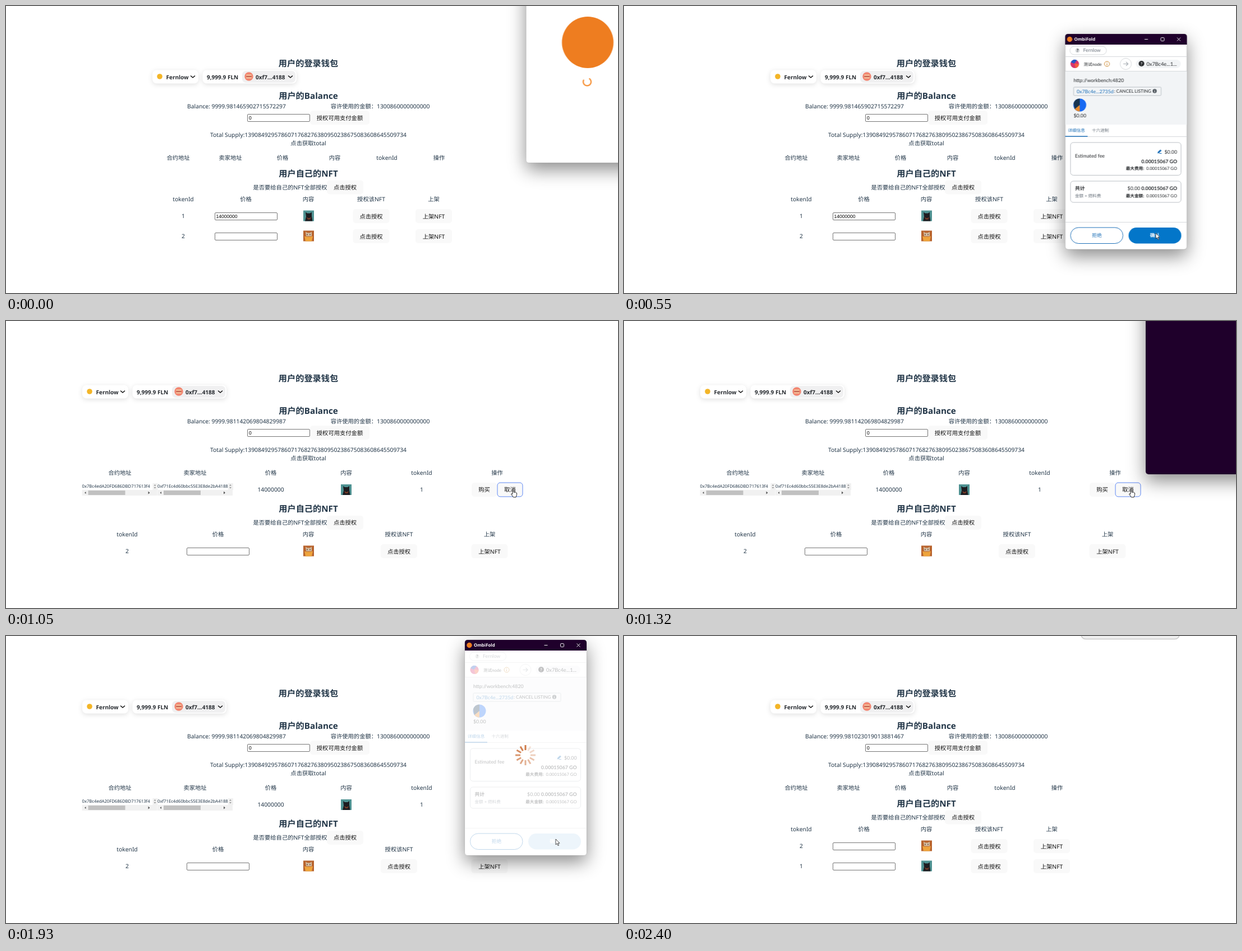
An HTML page for the animation above (2.67 s loop, 1091x513 px).

```html
<!DOCTYPE html>
<html lang="zh-CN">
<head>
<meta charset="utf-8">
<title>NFT wallet demo</title>
<style>
html, body { margin: 0; width: 100%; height: 100%; overflow: hidden; background: #fff; }
svg { display: block; }
text { font: 10.3px "Noto Sans", "Noto Sans CJK SC", "Noto Sans CJK", sans-serif; fill: #213547; text-rendering: geometricPrecision; }
.mid text, text.mid { text-anchor: middle; }
text.head { font-size: 15.2px; font-weight: 700; }
.button { fill: #f9f9f9; }
.button text { fill: #111; text-anchor: middle; }
.field { fill: #fff; stroke: #767676; }
text.value { font: 8.55px "Liberation Sans", sans-serif; fill: #000; }
text.hex { font-size: 7.7px; }
.wallet text { font-size: 10px; font-weight: 700; fill: #25292e; }
.card { fill: #fff; filter: drop-shadow(0 2px 4px rgba(0,0,0,.12)); }
.chevron { fill: none; stroke: #111; stroke-width: 1.6; stroke-linecap: round; stroke-linejoin: round; }
.ring { fill: none; stroke: #101010; stroke-width: 1.4; }

.frame { fill: #fff; stroke: #aaa; stroke-width: .6; filter: drop-shadow(0 12px 16px rgba(0,0,0,.45)); }
.form text { font-family: Lato, "Noto Sans CJK SC", "Noto Sans CJK", sans-serif; font-size: 8.8px; fill: #24272a; }
.form text.small { font-size: 7.6px; }
.form text.gray { fill: #6a737d; }
.form text.blue { fill: #1e70b8; }
.form text.white { fill: #fff; }
.form .end { text-anchor: end; }
.form .line { fill: none; stroke: #d6d9dc; }
.form .box { fill: #fff; stroke: #bbc0c5; }
.b { font-weight: 700; }

[class*="at-"], #window, #arrow, #halo, .ticks { animation: 2670ms step-end infinite; }
.at-before { animation-name: before !important; }
.at-wide { animation-name: wide !important; }
.at-after { animation-name: after !important; }
.at-narrow { animation-name: narrow !important; }
.at-listed { animation-name: listed !important; }
.at-hover { animation-name: hover !important; }
.at-cancelled { animation-name: cancelled !important; }
.at-toast { animation-name: toast !important; }
.at-loading { animation-name: loading !important; }
.at-blank { animation-name: blank !important; }
.at-ready { animation-name: ready !important; }
.at-busy { animation-name: busy !important; }
#window { animation-name: window; }
#arrow { animation-name: arrow; }
#halo { animation-name: halo; }
.ticks { animation-name: tick; }
.arc { animation: spin 2670ms linear infinite; }

@keyframes before { 0% { opacity: 1 } 36.7%, 100% { opacity: 0 } }
@keyframes wide { 0% { opacity: 0 } 36.7% { opacity: 1 } 85.01%, 100% { opacity: 0 } }
@keyframes after { 0% { opacity: 0 } 85.01%, 100% { opacity: 1 } }
@keyframes narrow { 0% { opacity: 1 } 36.7% { opacity: 0 } 85.01%, 100% { opacity: 1 } }
@keyframes listed { 0% { opacity: 0 } 28.46% { opacity: 1 } 36.7%, 100% { opacity: 0 } }
@keyframes hover { 0% { opacity: 0 } 39.32% { opacity: 1 } 54.3%, 100% { opacity: 0 } }
@keyframes cancelled { 0% { opacity: 0 } 79.77% { opacity: 1 } 85.01%, 100% { opacity: 0 } }
@keyframes toast { 0% { opacity: 0 } 89.88%, 100% { opacity: 1 } }
@keyframes loading { 0% { opacity: 1 } 15.35% { opacity: 0 } 52.05% { opacity: 1 } 54.3%, 100% { opacity: 0 } }
@keyframes blank { 0% { opacity: 0 } 49.43% { opacity: 1 } 52.05%, 100% { opacity: 0 } }
@keyframes ready { 0% { opacity: 0 } 17.97% { opacity: 1 } 23.22% { opacity: 0 } 59.55% { opacity: 1 } 72.28%, 100% { opacity: 0 } }
@keyframes busy { 0% { opacity: 0 } 23.22% { opacity: 1 } 28.46% { opacity: 0 } 72.28% { opacity: 1 } 79.77%, 100% { opacity: 0 } }
@keyframes window {
  0% { transform: translate(927.5px, -105px); opacity: 1 }
  5.24% { transform: translate(913px, -90px); opacity: 1 }
  7.49% { transform: translate(850px, -20px); opacity: 1 }
  10.11% { transform: translate(786.5px, 50px); opacity: 1 }
  28.46% { transform: translate(930px, -111px); opacity: 0 }
  49.43% { transform: translate(930px, -111px); opacity: 1 }
  52.05% { transform: translate(927.5px, -105px); opacity: 1 }
  54.3% { transform: translate(905px, -70px); opacity: 1 }
  56.92% { transform: translate(866.5px, -17px); opacity: 1 }
  59.55% { transform: translate(818px, 7px); opacity: 1 }
  79.77%, 100% { transform: translate(818px, 7px); opacity: 0 }
}
@keyframes arrow {
  0% { transform: translate(925px, -6px); opacity: 0 }
  7.49% { transform: translate(925px, -6px); opacity: 1 }
  10.11% { transform: translate(862px, 63px); opacity: 1 }
  15.35% { transform: translate(905px, 240px); opacity: 1 }
  17.97% { transform: translate(948px, 406px); opacity: 1 }
  28.46% { transform: translate(948px, 406px); opacity: 0 }
  56.92% { transform: translate(931px, 5px); opacity: 1 }
  59.55% { transform: translate(884px, 27px); opacity: 1 }
  62.17% { transform: translate(980px, 363px); opacity: 1 }
  85.01%, 100% { transform: translate(980px, 363px); opacity: 0 }
}
@keyframes halo { 0% { opacity: 1 } 15.35% { opacity: 0 } 56.92% { opacity: 1 } 62.17%, 100% { opacity: 0 } }
@keyframes tick {
  0% { transform: rotate(0deg) } 25.84% { transform: rotate(60deg) }
  72.28% { transform: rotate(0deg) } 74.9% { transform: rotate(30deg) } 77.15%, 100% { transform: rotate(60deg) }
}
@keyframes spin { from { transform: rotate(-60deg) } to { transform: rotate(830deg) } }
</style>
</head>
<body>
<svg width="1091" height="513" viewBox="0 0 1091 513">
<defs>
  <rect id="field" class="field" x="-55.5" y="-6.5" width="111" height="13" rx="1.5"/>
  <rect id="outline" x="-32.5" y="-12.5" width="65" height="25" rx="5"/>
  <g id="approve" class="button"><use href="#outline"/><text y="4">点击授权</text></g>
  <g id="sell" class="button"><use href="#outline"/><text y="4">上架NFT</text></g>
  <g id="darkCat">
    <path fill="#4f9292" d="M0 0h19v19H0z"/>
    <path fill="#1d1c20" d="M4 3l3 2h5l3-2v7l1.5 9H3l2-8z"/>
    <path fill="#7b3b27" d="M6 12l4 2 4-2-2 4H8z"/>
  </g>
  <g id="paleCat">
    <path fill="#b8642f" d="M0 0h19v19H0z"/>
    <path fill="#d3bda2" d="M4 2l3 2h5l3-2v8H5z"/>
    <path fill="#eea43c" d="M2 10l4 1h7l4-1-2 9H4z"/>
    <path fill="#80614b" d="M6 6h2v2H6zM11 6h2v2h-2z"/>
  </g>
  <g id="wallet" class="wallet">
    <rect class="card" x="261" y="114.5" width="82" height="24" rx="7.5"/>
    <circle cx="274" cy="126" r="4.8" fill="#f3b527"/>
    <text x="285.5" y="130.5">Fernlow</text>
    <path class="chevron" d="M329.5 125l3.5 3 3.5-3"/>
    <rect class="card" x="350.5" y="114.5" width="167.5" height="24" rx="7.5"/>
    <text x="358" y="130.5">9,999.9 FLN</text>
    <rect x="421" y="116" width="95" height="21" rx="6.5" fill="#f0f0f1"/>
    <circle cx="433" cy="126" r="7.7" fill="#f28570"/>
    <path d="M429 123.5h8M429 128.5h8" stroke="#f4c9a0" stroke-width="2" stroke-linecap="round"/>
    <path d="M428.5 126h9" stroke="#8e4a3a"/>
    <text x="445" y="130.5">0xf7...4188</text>
    <path class="chevron" d="M503.5 125l3.5 3 3.5-3"/>
  </g>
  <g id="owned" class="mid">
    <text class="head" x="539" y="305">用户自己的NFT</text>
    <text x="506.5" y="328">是否要给自己的NFT全部授权</text>
    <use href="#approve" x="604.5" y="324"/>
  </g>
  <g id="scroller">
    <path fill="#f1f1f1" d="M0 302h134v10H0zM126 290h9v12h-9z"/>
    <path fill="#c1c1c1" d="M11 303h66v8H11z"/>
    <path fill="#555" d="M7 305v4l-2.5-2zM118 304.5v5l3-2.5z"/>
    <path fill="#999" d="M128 294.5h4l-2-2.5zM128 297h4l-2 2.5z"/>
  </g>
</defs>

<g class="mid">
  <text class="head" x="539" y="107.5">用户的登录钱包</text>
  <text class="head" x="539" y="165.5">用户的Balance</text>
  <text x="411" y="183" class="at-before">Balance: 9999.981465902715572297</text>
  <text x="411" y="183" class="at-wide">Balance: 9999.981142069804829987</text>
  <text x="411" y="183" class="at-after">Balance: 9999.981023019013881467</text>
  <text x="667" y="183">容许使用的金额：1300860000000000</text>
  <text x="539" y="234">Total Supply:1390849295786071768276380950238675083608645509734</text>
  <text x="539" y="249">点击获取total</text>
</g>
<use href="#field" x="486" y="200"/>
<text class="value" x="433" y="202.5">0</text>
<g class="button"><rect x="542" y="187" width="106" height="25" rx="5"/><text x="595" y="203.5">授权可用支付金额</text></g>

<g class="at-narrow">
  <use href="#wallet"/>
  <g class="mid">
    <text y="274.5"><tspan x="307">合约地址</tspan><tspan x="400">卖家地址</tspan><tspan x="493">价格</tspan><tspan x="586">内容</tspan><tspan x="679">tokenId</tspan><tspan x="772">操作</tspan></text>
    <text y="348.5"><tspan x="316">tokenId</tspan><tspan x="427.5">价格</tspan><tspan x="539">内容</tspan><tspan x="651">授权该NFT</tspan><tspan x="762.5">上架</tspan></text>
  </g>
  <use href="#owned"/>
  <use href="#field" x="428" y="376"/><use href="#field" x="428" y="412"/>
  <use href="#approve" x="651" y="375.5"/><use href="#approve" x="651" y="411.5"/>
  <use href="#sell" x="762.5" y="375.5"/><use href="#sell" x="762.5" y="411.5"/>
</g>
<g class="at-before">
  <text class="mid" y="379"><tspan x="316">1</tspan><tspan x="316" y="415">2</tspan></text>
  <text class="value" x="374.5" y="379">14000000</text>
  <use href="#darkCat" x="530" y="365.5"/><use href="#paleCat" x="530" y="401.5"/>
</g>
<g class="at-after">
  <text class="mid" y="379"><tspan x="316">2</tspan><tspan x="316" y="415">1</tspan></text>
  <use href="#paleCat" x="530" y="365.5"/><use href="#darkCat" x="530" y="401.5"/>
</g>
<g class="at-listed"><use href="#outline" class="ring" x="762.5" y="375.5"/></g>

<g class="at-wide">
  <use href="#wallet" x="-125"/>
  <g class="mid">
    <text y="274.5"><tspan x="203">合约地址</tspan><tspan x="337">卖家地址</tspan><tspan x="472">价格</tspan><tspan x="606.5">内容</tspan><tspan x="741">tokenId</tspan><tspan x="875.5">操作</tspan></text>
    <text y="305"><tspan x="472">14000000</tspan><tspan x="741">1</tspan></text>
    <text y="384.5"><tspan x="216">tokenId</tspan><tspan x="378">价格</tspan><tspan x="539">内容</tspan><tspan x="700.5">授权该NFT</tspan><tspan x="862">上架</tspan></text>
    <text x="216" y="415">2</text>
  </g>
  <use href="#scroller" x="135.5"/><use href="#scroller" x="270"/>
  <text class="hex" x="135.5" y="298">0x7Bc4edA20FD686DBD717613f4</text>
  <text class="hex" x="270" y="298">0xf71Ec4d60bbc55E3E8de2bA4188</text>
  <use href="#darkCat" x="597" y="292"/><use href="#paleCat" x="530" y="401.5"/>
  <g class="button">
    <rect x="830" y="289" width="45" height="25" rx="5"/><text x="852.5" y="305">购买</text>
    <rect x="876" y="289" width="45" height="25" rx="5"/><text x="898.5" y="305">取消</text>
  </g>
  <use href="#owned" y="36.3"/>
  <use href="#field" x="378" y="412"/>
  <use href="#approve" x="700.5" y="411.5"/>
  <use href="#sell" x="862" y="411.5"/>
</g>
<rect class="at-cancelled ring" x="876" y="289" width="45" height="25" rx="5"/>
<g class="at-hover">
  <rect x="876" y="289" width="45" height="25" rx="5" fill="none" stroke="#5c86f2"/>
  <path transform="translate(900 300)" fill="#fff" stroke="#111" stroke-width=".9" stroke-linejoin="round" d="M3 8V1.5q1-1.5 2 0V6q4-.5 5.5 1.5v3L9 15H4.5L.5 9.5q0-2 2.5 0z"/>
</g>

<g id="window">
  <rect class="frame" width="217" height="385" rx="5"/>
  <g class="form">
    <path fill="#f2f4f6" d="M0 67h217v95H0z"/>
    <path class="line" d="M0 40.5h217M0 66.5h217M0 183.5h217M0 336.5h217"/>
    <rect class="line" x="8.5" y="22" width="65" height="15" rx="7.5"/>
    <circle cx="22" cy="29.5" r="3.8" fill="#d6d9dc"/>
    <text class="small b mid" x="22" y="32">?</text>
    <text class="gray" x="32" y="32.3">Fernlow</text>
    <circle cx="17" cy="53.5" r="7.6" fill="#d6336c"/>
    <path fill="#2457c5" d="M10 50.5q4-7 11-3.5l-5 6z"/>
    <path fill="#f2603c" d="M24.6 53.5q0 6-6 7.5l-2-8z"/>
    <text class="small" x="33" y="56.5">测试node</text>
    <circle cx="74.5" cy="53.5" r="4.5" fill="none" stroke="#c98225"/>
    <path d="M74.5 51v1M74.5 53v3" stroke="#c98225"/>
    <circle cx="108" cy="53.5" r="10" fill="#fff" stroke="#d6d9dc"/>
    <path d="M103.5 53.5h8.5m-3.5-3.5l3.5 3.5-3.5 3.5" fill="none" stroke="#a5acb2" stroke-width="1.2"/>
    <rect x="126" y="46" width="80" height="15" rx="7.5" fill="#f2f4f6"/>
    <circle cx="136" cy="53" r="5" fill="#24272a"/>
    <text class="small b mid white" x="136" y="56">?</text>
    <text x="145" y="56.5" style="font-size:9.2px">0x7Bc4e...1...</text>
    <text x="15" y="85.5">http://workbench:4820</text>
    <rect class="box" x="15" y="95" width="156" height="15" rx="1.5" fill-opacity="0"/>
    <text class="blue" x="20.5" y="105.5">0x7Bc4e...2735d</text>
    <text x="87" y="105.2" style="font-size:8px">: CANCEL LISTING</text>
    <circle cx="159.5" cy="102" r="3.7" fill="#535a61"/>
    <path d="M159.5 100v.8M159.5 101.8v2.5" stroke="#fff"/>
    <circle cx="26" cy="127" r="11.5" fill="#1769f2"/>
    <path fill="#17334f" d="M26 127V115.5q-8 0-11 8l2 11z"/>
    <path fill="#e8892b" d="M26 127l-9 7.2q4 4.3 9 4.3z"/>
    <text x="15" y="148.5">$0.00</text>
    <text class="small blue" x="5" y="175">详细信息</text>
    <text class="small gray" x="47.5" y="175">十六进制</text>
    <path d="M0 183h40" stroke="#1e70b8" stroke-width="1.4"/>
    <rect class="box" x="9.5" y="194" width="197" height="58.5" rx="5"/>
    <text x="17.5" y="220.5">Estimated fee</text>
    <path fill="#1e70b8" d="M164.5 213.5l.8-3 4.5-4 2 2-4.3 4.3zM167.5 213h4.5v1h-4.5z"/>
    <text class="end" x="199.5" y="213.5">$0.00</text>
    <text class="end b" x="199.5" y="230.5">0.00015067 GO</text>
    <text class="small end" x="199.5" y="243" xml:space="preserve"><tspan class="b">最大费用:</tspan>  0.00015067 GO</text>
    <rect class="box" x="9.5" y="263" width="197" height="38" rx="5"/>
    <text class="b" x="17.5" y="279">共计</text>
    <text class="end" x="199.5" y="279">$0.00 <tspan class="b">0.00015067 GO</tspan></text>
    <text class="small gray" x="17.5" y="292">金额 + 燃料费</text>
    <text class="small end" x="199.5" y="292" xml:space="preserve"><tspan class="b">最大金额:</tspan>  0.00015067 GO</text>
    <rect x="9.5" y="346" width="93.5" height="28.5" rx="14.2" fill="#fff" stroke="#1e70b8"/>
    <text class="blue mid" x="56.5" y="362.5">拒绝</text>
    <rect x="113" y="346" width="94" height="28.5" rx="14.2" fill="#bfdcf1"/>
    <rect class="at-ready" x="113" y="346" width="94" height="28.5" rx="14.2" fill="#0376c9"/>
    <text class="white b mid" x="160" y="362.5">确认</text>
  </g>
  <g class="at-busy">
    <path fill="#fff" opacity=".72" d="M0 19h217v361q0 5-5 5H5q-5 0-5-5z"/>
    <g transform="translate(108 206)"><g class="ticks" transform-origin="0 0"></g></g>
  </g>
  <g class="at-loading">
    <path fill="#fff" d="M0 19h217v361q0 5-5 5H5q-5 0-5-5z"/>
    <circle cx="109.5" cy="170" r="46" fill="#ee7d20"/>
    <g transform="translate(108.5 240.5)"><circle class="arc" r="7" fill="none" stroke="#f5841f" stroke-width="2" stroke-dasharray="33 11"/></g>
  </g>
  <path fill="#1f002b" d="M0 19V5q0-5 5-5h207q5 0 5 5v14z"/>
  <circle cx="8" cy="9.5" r="4.7" fill="#ee7d20"/>
  <text x="16" y="12.3" style="font-size:7.8px;font-weight:600;fill:#fff">OmbiFold</text>
  <path d="M141.5 9.5h6M199.5 6.5l6 6m0-6l-6 6" stroke="#fff" stroke-width=".9"/>
  <rect x="170.5" y="6.5" width="6" height="6" rx="1.2" fill="none" stroke="#fff" stroke-width=".9"/>
  <rect class="at-blank" width="217" height="385" rx="5" fill="#1f002b"/>
</g>

<rect class="at-toast" x="815" y="-30" width="175" height="35.5" rx="8" fill="#efefef" stroke="#c9c9c9" stroke-width="1.5"/>
<g id="arrow">
  <circle id="halo" r="7.5" fill="#ffd000" fill-opacity=".68"/>
  <path fill="#fff" stroke="#222" stroke-width=".8" stroke-linejoin="round" d="M0 0v10l2.3-2.1 1.7 3.8 1.6-.7-1.7-3.7H7z"/>
</g>
</svg>
<script>
const ticks = document.querySelector('.ticks');
const count = 12;
for (let i = 0; i < count; i++) {
  const line = document.createElementNS('http://www.w3.org/2000/svg', 'path');
  line.setAttribute('d', 'M0-9V-18');
  line.setAttribute('stroke', '#cf7a48');
  line.setAttribute('stroke-width', 3);
  line.setAttribute('opacity', 1 - 0.85 * i / count);
  line.setAttribute('transform', `rotate(${-i * 360 / count})`);
  ticks.append(line);
}
</script>
</body>
</html>
```
